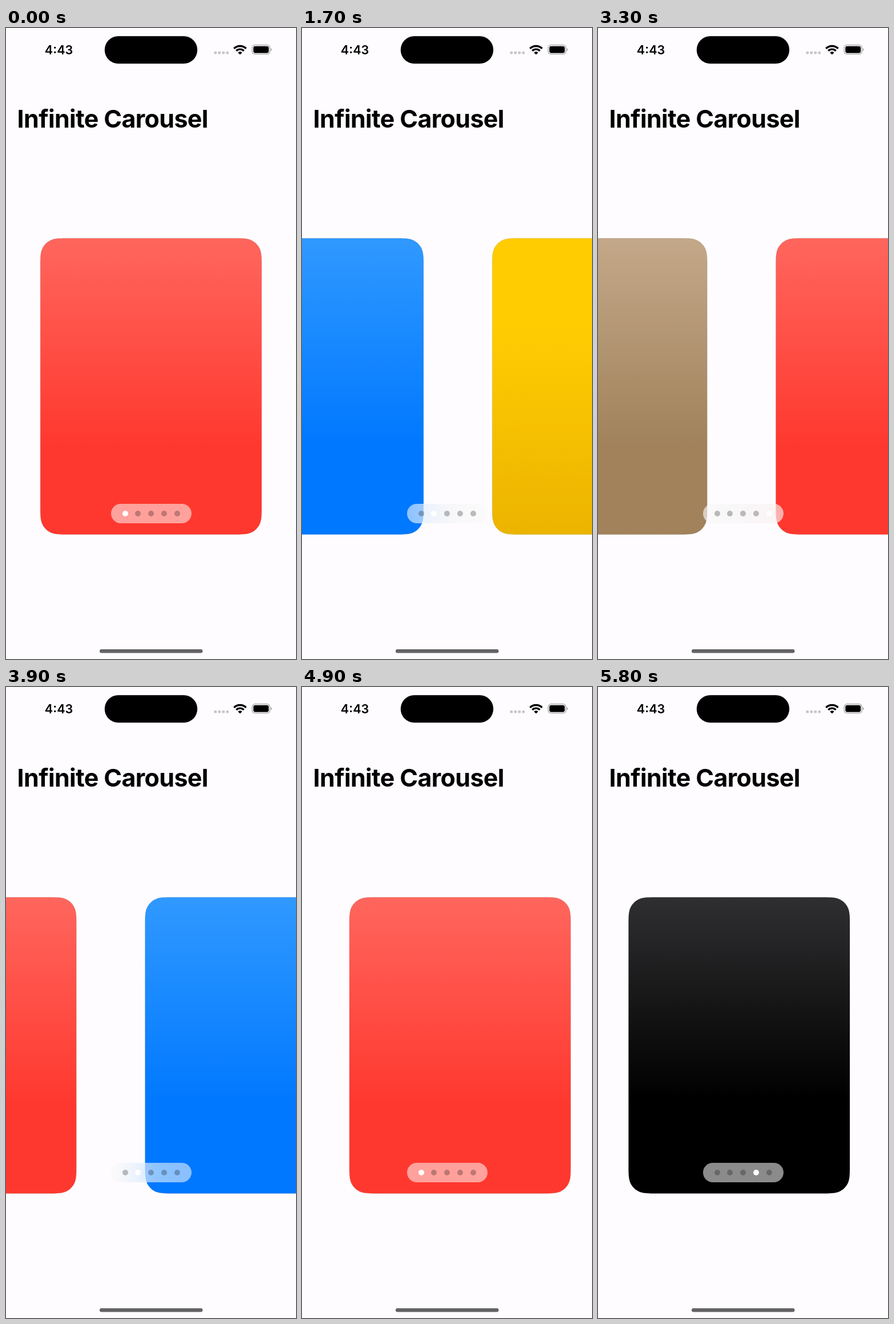
Write an HTML page that moves like this. It is 508 px wide and 1102 px high and loops after 5.9 s.

```html
<!DOCTYPE html>
<html lang="en">
<head>
<meta charset="utf-8">
<title>Infinite Carousel</title>
<style>
  html, body { margin: 0; width: 100%; height: 100%; overflow: hidden; background: #fefcff; }
  svg { position: absolute; left: 0; top: 0; display: block; }
  text { font-family: Inter, "Liberation Sans", sans-serif; fill: #000; }
  .title { font-size: 43px; font-weight: 700; letter-spacing: -.65px; }
  .clock { font-size: 21.7px; font-weight: 600; }
  .pill {
    position: absolute; left: 183.5px; top: 831px; width: 141px; height: 33.5px;
    border-radius: 17px; background: rgba(255, 255, 255, .545);
    backdrop-filter: blur(32px) brightness(.87) saturate(1.45);
  }
  .pill i {
    position: absolute; top: 11.5px; width: 10px; height: 10px;
    border-radius: 50%; background: rgba(0, 0, 0, .255);
  }
  .pill i.on { background: #fff; }
</style>
</head>
<body>
<svg width="508" height="1102" viewBox="0 0 508 1102">
  <defs>
    <clipPath id="fan"><path d="M410 46.5L392 28.5V20H428V28.5Z"/></clipPath>
  </defs>
  <g id="track"></g>
  <text class="title" x="19.6" y="173.5">Infinite Carousel</text>
  <text class="clock" x="67.8" y="46">4:43</text>
  <rect x="172.8" y="14.3" width="162.4" height="47.9" rx="23.9"/>
  <g fill="#c6c5c8">
    <rect x="364.5" y="41" width="4.6" height="4.6" rx="1.2"/>
    <rect x="371.5" y="41" width="4.6" height="4.6" rx="1.2"/>
    <rect x="378.5" y="41" width="4.6" height="4.6" rx="1.2"/>
    <rect x="385.5" y="41" width="4.6" height="4.6" rx="1.2"/>
  </g>
  <g clip-path="url(#fan)" fill="none" stroke="#000" stroke-width="3.3">
    <circle cx="410" cy="46.5" r="15"/>
    <circle cx="410" cy="46.5" r="9.3"/>
    <circle cx="410" cy="46.5" r="5.2" fill="#000" stroke="none"/>
  </g>
  <rect x="431.2" y="29.7" width="31.2" height="16" rx="5.2" fill="none" stroke="#a4a3a6" stroke-width="1.3"/>
  <rect x="433.3" y="31.8" width="27" height="11.9" rx="3.4"/>
  <path d="M463.9 35.3Q465.8 36.2 465.8 37.8T463.9 40.3Z" fill="#a4a3a6"/>
  <rect x="164" y="1085.1" width="180.5" height="6.4" rx="3.2" fill="#646366"/>
</svg>
<div class="pill" id="pill"></div>
<script>
  const LOOP = 5900, STEP = 100, SWIPE = 450, PAGE = 508;
  const CARD = { x: 60.2, y: 367.3, w: 387.6, h: 517.2, r: 32.3 };

  // top colour, bottom colour, where the blend starts and ends
  const colors = [
    ['#ff665d', '#ff382f', 0, .7],
    ['#3099ff', '#0078ff', 0, .7],
    ['#ffcc02', '#ecb400', .3, 1],
    ['#2f2e30', '#000000', 0, .68],
    ['#c3a889', '#a1825b', 0, .7]
  ];

  // start time and direction of each swipe
  const swipes = [
    [1140, 1], [1598, 1], [2128, 1], [2658, 1], [3187.4, 1], [3750, 1],
    [4342.8, -1], [4890, -1], [5422, -1]
  ];

  const svg = (tag, attrs, parent) => {
    const el = document.createElementNS('http://www.w3.org/2000/svg', tag);
    for (const k in attrs) el.setAttribute(k, attrs[k]);
    return parent.appendChild(el);
  };

  // rounded rectangle with continuous corners
  function squircle({ x, y, w, h, r }) {
    const corner = [
      [0, 1.5287], [0, 1.0885], [0, .8684], [.0749, .6315],
      [.1691, .3728], [.3728, .1691], [.6315, .0749],
      [.8684, 0], [1.0885, 0], [1.5287, 0]
    ];
    const place = (right, bottom) => corner.map(([a, b]) =>
      `${right ? x + w - a * r : x + a * r} ${bottom ? y + h - b * r : y + b * r}`);
    const sides = [place(0, 0), place(1, 0).reverse(), place(1, 1), place(0, 1).reverse()];
    return sides.map((p, i) => `${i ? 'L' : 'M'}${p[0]}C${p.slice(1).join(' ')}`).join('') + 'Z';
  }

  const track = document.getElementById('track');
  const pill = document.getElementById('pill');
  const defs = document.querySelector('defs');
  const outline = squircle(CARD);

  colors.forEach(([top, bottom, from, to], i) => {
    const g = svg('linearGradient', { id: 'c' + i, x2: 0, y2: 1 }, defs);
    svg('stop', { offset: from, 'stop-color': top }, g);
    svg('stop', { offset: to, 'stop-color': bottom }, g);
  });
  for (let i = 0; i < 8; i++) {
    svg('path', {
      d: outline, fill: `url(#c${i % 5})`, transform: `translate(${i * PAGE})`,
      stroke: '#000', 'stroke-opacity': .15, 'stroke-width': .7
    }, track);
  }
  const dots = colors.map((_, i) => {
    const dot = pill.appendChild(document.createElement('i'));
    dot.style.left = 20.1 + i * 22.85 + 'px';
    return dot;
  });

  // cubic-bezier(.25, .5, .4, 1)
  function ease(x) {
    if (x <= 0) return 0;
    if (x >= 1) return 1;
    const curve = (a, b, u) => 3 * (1 - u) * u * ((1 - u) * a + u * b) + u ** 3;
    let lo = 0, hi = 1;
    for (let i = 0; i < 24; i++) {
      const mid = (lo + hi) / 2;
      if (curve(.25, .4, mid) < x) lo = mid; else hi = mid;
    }
    return curve(.5, 1, lo);
  }

  function draw() {
    const t = Math.floor(performance.now() % LOOP / STEP) * STEP;
    const pos = swipes.reduce((p, [start, dir]) => p + dir * ease((t - start) / SWIPE), 0);
    track.setAttribute('transform', `translate(${(-pos * PAGE).toFixed(2)})`);
    const active = Math.round(pos - .02) % 5;
    dots.forEach((dot, i) => dot.classList.toggle('on', i === active));
    requestAnimationFrame(draw);
  }
  draw();
</script>
</body>
</html>
```
